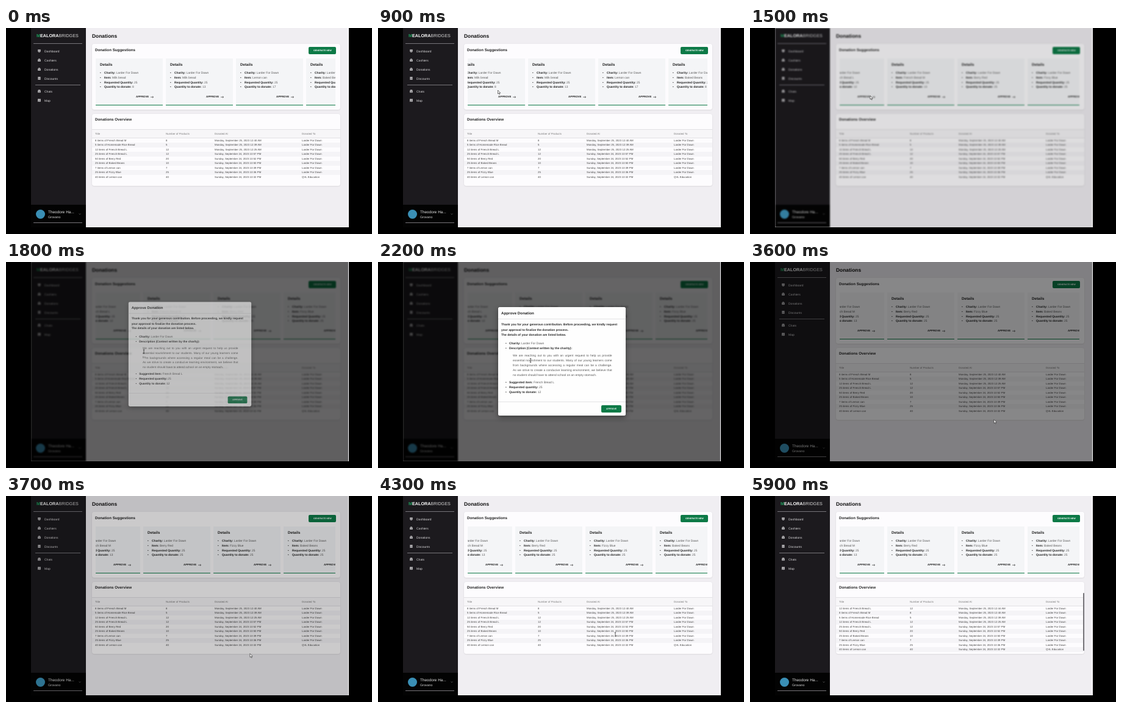
These frames come from a looping animation (600x338 px, 6200 ms). An HTML page:

```html
<!DOCTYPE html>
<html lang="en">
<head>
<meta charset="utf-8">
<title>Donations dashboard</title>
<style>
html, body { margin: 0; width: 100%; height: 100%; overflow: hidden; background: #000; }
body { font-family: "Liberation Sans", Arial, sans-serif; color: #555; text-rendering: geometricPrecision; }
div, svg { position: absolute; box-sizing: border-box; }
b { color: #222; }
/* Set large and scaled down, with a hair of rotation, so baselines do not snap to whole pixels. */
.text { line-height: 0; white-space: pre; transform-origin: 0 0; transform: scale(.1) rotate(.01deg); }
#stage { width: 600px; height: 338px; overflow: hidden; }
#screen { left: 41px; width: 521px; height: 327px; overflow: hidden; background: #fff; }
#page { left: -41px; width: 560.5px; height: 327px; background: #f0eef2; overflow: hidden; }
#shade { width: 519.5px; height: 327px; background: #000; }
.panel { left: 141px; width: 407px; background: #fdfcfe; border-radius: 3.5px; box-shadow: 0 .5px 2px #0002; }
.button { background: #0d7a47; border-radius: 2px; }
#viewport { left: 147px; top: 50px; width: 393px; height: 77px; overflow: hidden; }
#cards { display: flex; gap: 5px; }
.card { position: relative; flex: none; width: 110px; height: 77px; background: #f4f5f7; border-bottom: 1.7px solid #0d7a47; }
#modal { left: 197px; width: 208.5px; background: #fefefe; border-radius: 2.5px; box-shadow: 0 3px 8px #0006; }
.spread { width: 1625px; text-align: justify; text-align-last: justify; white-space: normal; }
</style>
</head>
<body>
<div id="stage">
  <div id="screen"><div id="page"></div><div id="shade"></div></div>
  <div id="modal"></div>
  <svg id="cursor" width="8" height="10" overflow="visible">
    <path id="arrow" d="M0 0V6L1.4 4.8L2.4 7L3.3 6.6L2.4 4.5H4.2Z" fill="#fff" stroke="#222" stroke-width=".6"/>
    <path id="beam" d="M-1.2-3H1.2M0-3V3M-1.2 3H1.2" fill="none" stroke="#222" stroke-width=".7"/>
  </svg>
</div>
<script>
const $ = id => document.getElementById(id);
const text = (x, y, size, html, style = '', cls = '') =>
  `<div class="text ${cls}" style="left:${x}px;top:${y}px;font-size:${size * 10}px;${style}">${html}</div>`;
const box = (x, y, w, h, style, cls = '') =>
  `<div class="${cls}" style="left:${x}px;top:${y}px;width:${w}px;height:${h}px;${style}"></div>`;
const bold = (x, y, size, label, color = '#222') => text(x, y, size, `<b style="color:${color}">${label}</b>`);
const bullet = (x, y, size, label, value) =>
  text(x - 6.5, y, size, '•', 'color:#222') + text(x, y, size, `<b>${label}:</b> ${value}`);

const charity = 'Larder For Dawn';

// Sidebar
const bag = 'M.2 1.8H4.8V5H.2ZM1.5 1.8V.6H3.5V1.8';
const menu = [
  ['Dashboard', 37.5, 'M.3.5H4.7V3Q4.5 4.3 2.5 5Q.5 4.3.3 3Z'],
  ['Cashiers', 52.5, bag],
  ['Donations', 67.5, bag],
  ['Discounts', 82.5, 'M.6.2H4.4V5H.6Z'],
  ['Chats', 104, 'M1 .6H4L4.9 3V4.8H.1V3Z'],
  ['Map', 119, 'M.1.8L1.7.2L3.3.8L4.9.2V4.4L3.3 5L1.7 4.4L.1 5Z'],
];
const line = (x, y, w) => box(x, y, w, .7, 'background:#77757a');
const sidebar = box(41, 0, 89.5, 290, 'background:#1c1a1e') + box(41, 289.5, 89.5, 38, 'background:#030303')
  + text(50, 13, 7.2, '<b style="color:#1f9d5c">M</b><b style="color:#fff">EALORA</b>BRIDGES', 'color:#d8d8d8')
  + line(45, 25.3, 80) + line(48, 92.8, 74) + line(45, 319.2, 80)
  + menu.map(([label, y, path]) => text(62.7, y, 5, label, 'color:#dcdbdd')
    + `<svg style="left:52px;top:${y - 2.6}px" width="5.2" height="5.2" viewBox="0 0 5.2 5.2">
       <path d="${path}" fill="#b5b4b7" stroke="#b5b4b7" stroke-width=".4"/><path d="M1.5 3H3.6" stroke="#333" stroke-width=".6"/></svg>`).join('')
  + box(48.8, 297.8, 15, 15, 'background:#3a8fb5;border-radius:50%')
  + text(69, 302.3, 6.4, 'Theodore Ha...', 'color:#e8e8e8') + text(69, 309.6, 5.3, 'Grovano', 'color:#e0e0e0')
  + '<svg style="left:119px;top:304px" width="4" height="3"><path d="M.5.5L2 2L3.5.5" fill="none" stroke="#777" stroke-width=".6"/></svg>';

// Suggestion cards
const suggestions = [
  ['Milk bread', 8], ['Milk bread', 13], ['Lemon can', 17], ['Baked Beans', 8], ['French Bread L', 12],
  ['French Bread M', 13], ['Berry Red', 25], ['Fizzy Blue', 25], ['Baked Beans', 25],
];
const cards = suggestions.map(([item, count]) => '<div class="card">' + bold(7, 10.3, 6.2, 'Details')
  + [['Charity', charity], ['Item', item], ['Requested Quantity', 25], ['Quantity to donate', count]]
    .map(([label, value], i) => bullet(13.5, 23.4 + i * 7.6, 4.87, label, value)).join('')
  + bold(66, 63.3, 4.35, 'APPROVE')
  + '<svg style="left:90px;top:61px" width="6" height="5"><path d="M0 2.3H4.6M3 .8L4.6 2.3L3 3.8" fill="none" stroke="#222" stroke-width=".6"/></svg></div>').join('');

// Overview table
const columns = [146, 262, 342, 485];
const orders = [
  [12, 'French Bread L', 12, '12:44'], [8, 'French Bread M', 8, '12:40'], [5, 'Homemade Rice Bread', 5, '12:39'],
  [12, 'French Bread L', 12, '12:25'], [25, 'French Bread L', 12, '10:57'], [50, 'Berry Red', 20, '10:52'],
  [25, 'Baked Beans', 10, '10:50'], [7, 'Lemon can', 7, '10:39'], [25, 'Fizzy Blue', 25, '10:36'],
  [40, 'Lemon can', 40, '10:32'],
];
const dateOf = time => time.startsWith('12')
  ? `Monday, September 25, 2023 ${time} AM` : `Sunday, September 24, 2023 ${time} PM`;
const tableRows = from => orders.slice(from).map(([size, item, count, time], i) => {
  const y = 184.5 + i * 7.5;
  const cells = [`${size} items of ${item}`, count, dateOf(time), time === '10:32' ? 'QVL Education' : charity];
  return (i % 2 ? box(141, y - 3.75, 407, 7.5, 'background:#f5f4f7') : '')
    + cells.map((cell, c) => text(columns[c], y, 4.36, cell, 'color:#444')).join('');
}).join('');
const headings = ['Title', 'Number of Products', 'Donated At', 'Donated To'];

$('page').innerHTML = sidebar + bold(141, 12.6, 8.4, 'Donations', '#111')
  + box(141, 26, 407, 108, '', 'panel') + box(141, 140.5, 407, 118, '', 'panel')
  + bold(146, 36.3, 6.22, 'Donation Suggestions') + bold(146, 149.5, 6.24, 'Donations Overview')
  + box(496, 30.5, 45, 12, '', 'button') + bold(503.5, 36.5, 3.68, 'GENERATE NEW', '#fff')
  + `<div id="viewport"><div id="cards">${cards}</div></div>`
  + box(141, 166, 407, 14.7, 'background:#f7f6f8;border:solid #e2e1e4;border-width:.6px 0')
  + headings.map((h, i) => text(columns[i], 173.8, 4.38, h, 'color:#777')).join('')
  + `<div id="before">${tableRows(1)}</div><div id="after">${tableRows(0)}`
  + box(546, 159, 2, 95, 'background:#77757a;border-radius:1px') + '</div>';

// Approval dialog
const intro = ['Thank you for your generous contribution. Before proceeding, we kindly request',
  'your approval to finalize the donation process.', 'The details of your donation are listed below.'];
const story = ['We are reaching out to you with an urgent request to help us provide',
  'essential nourishment to our students. Many of our young learners come',
  'from backgrounds where accessing a regular meal can be a challenge.',
  'As we strive to create a conducive learning environment, we believe that',
  'no student should have to attend school on an empty stomach.'];
const rule = y => box(0, y, 208.5, .6, 'background:#e3e3e5');
$('modal').innerHTML = bold(5, 9.6, 6.2, 'Approve Donation') + rule(19) + rule(155)
  + intro.map((s, i) => bold(5, 28.4 + i * 8.15, 4.97, s)).join('')
  + bullet(18, 59, 4.95, 'Charity', charity) + bullet(18, 67.2, 4.95, 'Description (Context written by the charity)', '')
  + story.map((s, i) => text(23.5, 79 + i * 8.05, 4.94, s, '', i < 4 ? 'spread' : '')).join('')
  + [['Suggested item', 'French Bread L'], ['Requested quantity', 25], ['Quantity to donate', 12]]
    .map(([label, value], i) => bullet(18, 123.3 + i * 8.05, 4.95, label, value)).join('')
  + `<div id="approve" class="button" style="left:168.5px;top:161px;width:33px">
     <div id="label">${bold(8.4, 6, 3.5, 'APPROVE', '#fff')}</div>
     <svg id="spinner" style="left:12px;top:3px" width="8" height="8" viewBox="-4 -4 8 8">
     <path d="M2.1-2.1A3 3 0 1 0 2.1 2.1" fill="none" stroke="#fff" stroke-width=".9"/></svg></div>`;

// Motion
const ramp = (t, start, length) => Math.min(1, Math.max(0, (t - start) / length));
const smooth = p => p * p * (3 - 2 * p);
const show = (id, on) => { $(id).style.display = on ? '' : 'none'; };
const pointer = [[600, 225, 150], [900, 196.5, 102], [1500, 197, 111], [1800, 226, 147], [2100, 226, 147],
  [2500, 380, 240], [2600, 380, 240], [2800, 400, 258.5], [3800, 400, 258.5], [4300, 389, 227], [5100, 389, 227]];

function pointerAt(t) {
  const next = Math.max(1, pointer.findIndex(p => p[0] > t));
  const [t0, x0, y0] = pointer[next - 1], [t1, x1, y1] = pointer[next];
  const p = smooth(ramp(t, t0, t1 - t0));
  return [x0 + (x1 - x0) * p, y0 + (y1 - y0) * p];
}

function renderModal(t) {
  const enter = smooth(ramp(t, 1655, 300));
  const loading = t >= 2600;
  // The spinner makes the button, and so the centred dialog, a little taller.
  const buttonHeight = loading ? 14.5 : 12;
  const height = 165.5 + buttonHeight;
  Object.assign($('modal').style, {
    top: `${163 - height / 2}px`,
    height: `${height}px`,
    opacity: ramp(t, 1620, 300) * (1 - ramp(t, 3450, 150)),
    transform: `translateY(${-22.5 * (1 - enter)}px) scale(${.93 + .07 * enter})`,
  });
  show('label', !loading);
  show('spinner', loading);
  $('approve').style.height = `${buttonHeight}px`;
  $('approve').style.background = loading ? '#86bda3' : '';
  $('spinner').style.transform = `rotate(${(t - 2800) * .45}deg)`;
}

function render(now) {
  const t = Math.floor(now % 6200 / 100) * 100;
  $('cards').style.transform = `translateX(${-497 * smooth(ramp(t, 840, 560))}px)`;
  $('cards').children[4].style.display = t >= 3500 ? 'none' : '';

  $('shade').style.opacity = .6 * (ramp(t, 1450, 250) - ramp(t, 3550, 225));
  $('page').style.filter = t >= 1500 && t < 3600 ? 'blur(.8px)' : '';
  renderModal(t);

  const updated = t >= 5100;
  show('before', !updated);
  show('after', updated);

  const [x, y] = pointerAt(t);
  const overText = t >= 1700 && t < 2300 || t >= 4200;
  show('cursor', t >= 600 && t < 5100);
  show('arrow', !overText);
  show('beam', overText);
  $('cursor').style.transform = `translate(${x}px, ${y}px)`;
  requestAnimationFrame(render);
}
requestAnimationFrame(render);
</script>
</body>
</html>
```
